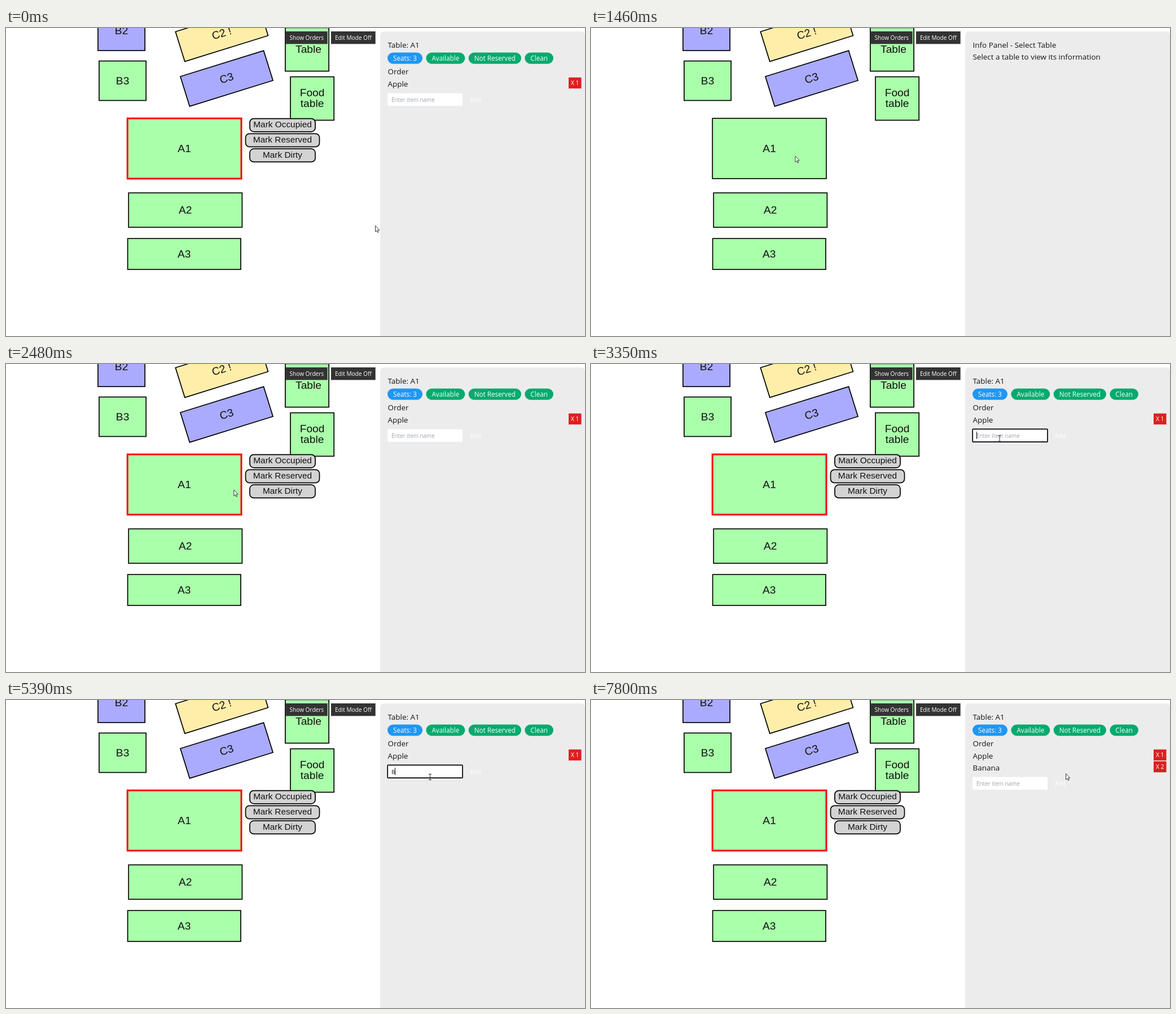
These frames come from a looping animation (1026 by 546 pixels, 8 s). An HTML page:

```html
<!DOCTYPE html>
<html lang="en">
<head>
<meta charset="utf-8">
<title>Table planner</title>
<style>
  html, body { margin: 0; width: 100%; height: 100%; overflow: hidden; background: #fff; }
  svg { display: block; }
  text { white-space: pre; }
  .plan { font-family: "Liberation Sans", Arial, sans-serif; fill: #111; text-anchor: middle; }
  .panel { font-family: "Open Sans", "Noto Sans", sans-serif; fill: #151515; }
  .light { fill: #fff; }
  .hint { fill: #9ca3af; }
  .mid { text-anchor: middle; }
  .outlined { stroke: #000; stroke-width: 1.7; }
  .outlined.selected { stroke: #f00; stroke-width: 3; }
</style>
</head>
<body>
<svg id="stage" width="1026" height="546" viewBox="0 0 1026 546"></svg>
<script>
const LOOP = 8000;
const GREEN = '#aaffaa', BLUE = '#aaaaff', YELLOW = '#ffeeaa';
const ROW = 21;
const stage = document.getElementById('stage');

function add(parent, tag, attrs = {}, content = '') {
  const node = document.createElementNS('http://www.w3.org/2000/svg', tag);
  for (const key in attrs) node.setAttribute(key, attrs[key]);
  node.textContent = content;
  parent.appendChild(node);
  return node;
}
const group = (parent = stage) => add(parent, 'g');
const rect = (parent, x, y, width, height, fill, more = {}) =>
  add(parent, 'rect', { x, y, width, height, fill, ...more });
const planText = (parent, x, y, size, content) =>
  add(parent, 'text', { class: 'plan', x, y, 'font-size': size }, content);
const panelText = (parent, x, y, size, content, style = '') =>
  add(parent, 'text', { class: `panel ${style}`, x, y, 'font-size': size }, content);
const show = (node, on) => node.setAttribute('display', on ? 'inline' : 'none');

// Floor plan
function table(cx, cy, w, h, fill, label, textY = cy + 6) {
  const box = rect(stage, cx - w / 2, cy - h / 2, w, h, fill, { class: 'outlined' });
  label.split(' ').forEach((line, i) => planText(stage, cx, textY + i * 19, 19.2, line));
  return box;
}
function tiltedTable(cx, cy, fill, label) {
  const g = add(stage, 'g', { transform: `translate(${cx} ${cy}) rotate(-17.3)` });
  rect(g, -77.3, -27.7, 154.6, 55.4, fill, { class: 'outlined' });
  planText(g, 0, 5.8, 19.2, label);
}
table(204.6, 5, 83.2, 70, BLUE, 'B2');
table(206.6, 93.5, 83.2, 70, GREEN, 'B3');
tiltedTable(382.4, 10, YELLOW, 'C2 !');
tiltedTable(391, 89.5, BLUE, 'C3');
table(533.5, 38, 77.2, 77, GREEN, '');
planText(stage, 536, 44, 19.2, 'Table');
table(542.6, 125, 77.2, 77, GREEN, 'Food table', 121);
const mainTable = table(316.1, 213.6, 201.8, 106.8, GREEN, 'A1');
table(317.8, 322.8, 201.2, 61, GREEN, 'A2');
table(315.8, 400.6, 200.4, 54.8, GREEN, 'A3');

const actions = group();
['Occupied', 'Reserved', 'Dirty'].forEach((state, i) => {
  const width = state === 'Reserved' ? 131 : 116;
  rect(actions, 490 - width / 2, 160.6 + i * 26.8, width, 23.2, '#d3d3d3',
    { rx: 7, class: 'outlined' });
  planText(actions, 490, 176.3 + i * 27, 15.4, `Mark ${state}`);
});

function toolButton(x, w, label) {
  rect(stage, x, 6, w, 22.3, '#333');
  panelText(stage, x + w / 2, 21, 10.1, label, 'light mid');
}
toolButton(496, 73.7, 'Show Orders');
toolButton(576, 78.7, 'Edit Mode Off');

// Side panel
const heading = (parent, row, content) => panelText(parent, 676.5, 35 + row * ROW, 13.45, content);
rect(stage, 663, 6, 363, 560, '#ececec', { rx: 7 });
const emptyInfo = group();
heading(emptyInfo, 0, 'Info Panel - Select Table');
heading(emptyInfo, 1, 'Select a table to view its information');

const info = group();
heading(info, 0, 'Table: A1');
let pillX = 676;
for (const label of ['Seats: 3', 'Available', 'Not Reserved', 'Clean']) {
  const pill = rect(info, pillX, 43.5, 0, 20, label.startsWith('Seats') ? '#2196f3' : '#04aa6d', { rx: 10 });
  const width = panelText(info, pillX + 10, 58, 11.7, label, 'light').getComputedTextLength() + 20;
  pill.setAttribute('width', width);
  pillX += width + 6.4;
}
heading(info, 2.25, 'Order');

function orderRow(parent, index, name) {
  const row = 2.27 + index;
  heading(parent, row, name);
  rect(parent, 997, 19 + row * ROW, 22.5, 19.5, '#dc2020');
  panelText(parent, 1008.2, 32.7 + row * ROW, 10.2, `X ${index}`, 'light mid');
}
orderRow(info, 1, 'Apple');
const bananaRow = group(info);
orderRow(bananaRow, 2, 'Banana');

const form = group(info);
const field = rect(form, 676.2, 115.4, 132.8, 22.7, '#fff', { rx: 1 });
const hint = panelText(form, 683, 130.7, 9.9, 'Enter item name', 'hint');
const typed = panelText(form, 683, 130.7, 9.7);
const caret = rect(form, 683, 120, 1, 13, '#111');
panelText(form, 822, 130.7, 10.5, 'Add', 'light');

// Pointer
const arrow = add(stage, 'path', {
  d: 'M.5 .5V11.2L2.9 9 4.5 12.5 6.2 11.8 4.6 8.3H7.8Z',
  fill: '#fff', stroke: '#222', 'stroke-width': 0.9, 'stroke-linejoin': 'round',
});
const beam = add(stage, 'path', {
  d: 'M-2.5 -5H2.5M-2.5 5H2.5M0 -5V5', fill: 'none', stroke: '#333',
});

const DESELECT = 1460, SELECT = 2360, ENTER = 3230, FOCUS = 3350, LEAVE = 7520, SUBMIT = 7670;
const FIRST_KEY = 5390, KEY_GAP = 202, BLINK = 550, WORD = 'Banana';
const LAST_KEY = FIRST_KEY + KEY_GAP * (WORD.length - 1);
const STEP = 125;

const moves = [
  { from: 190, to: 1125, x: 361.5, y: 226.5 },
  { from: DESELECT, to: 1850, x: 546, y: 175 },
  { from: 1850, to: 2220, x: 402, y: 223 },
  { from: 2480, to: 3080, x: 819, y: 138 },
  { from: 3080, to: ENTER, x: 724, y: 132 },
  { from: FOCUS, to: 3620, x: 751.5, y: 136.5 },
  { from: 7120, to: 7370, x: 796.5, y: 134.5 },
  { from: 7370, to: LEAVE, x: 841, y: 130 },
];
const within = (t, from, to) => t >= from && t < to;
const smooth = p => p * p * (3 - 2 * p);

// The pointer advances in steps, as in a screen recording.
function pointerAt(t) {
  const time = Math.floor((t + 20) / STEP) * STEP;
  let x = 654, y = 350;
  for (const move of moves) {
    const p = smooth(Math.min(1, Math.max(0, (time - move.from) / (move.to - move.from))));
    x += (move.x - x) * p;
    y += (move.y - y) * p;
  }
  return `translate(${x} ${y})`;
}

function caretOn(t) {
  const lastInput = t < FIRST_KEY ? FOCUS : LAST_KEY;
  return t < lastInput || Math.floor((t - lastInput) / BLINK) % 2 === 0;
}

function draw(t) {
  const selected = !within(t, DESELECT, SELECT);
  const focused = within(t, FOCUS, SUBMIT);
  const added = t >= SUBMIT;

  mainTable.classList.toggle('selected', selected);
  show(actions, selected);
  show(info, selected);
  show(emptyInfo, !selected);
  show(bananaRow, added);
  form.setAttribute('transform', `translate(0 ${added ? ROW : 0})`);

  const letters = added ? 0 : Math.max(0, Math.floor((t - FIRST_KEY) / KEY_GAP) + 1);
  typed.textContent = WORD.slice(0, letters);
  show(hint, !letters);
  field.setAttribute('class', focused ? 'outlined' : '');
  show(caret, focused && caretOn(t));
  caret.setAttribute('x', Math.round(683 + (letters ? typed.getComputedTextLength() - 0.5 : 0)));

  const overField = within(t, ENTER, LEAVE);
  show(arrow, !overField);
  show(beam, overField);
  (overField ? beam : arrow).setAttribute('transform', pointerAt(t));
}

const start = performance.now();
function tick() {
  draw((performance.now() - start) % LOOP);
  requestAnimationFrame(tick);
}
tick();
</script>
</body>
</html>
```
